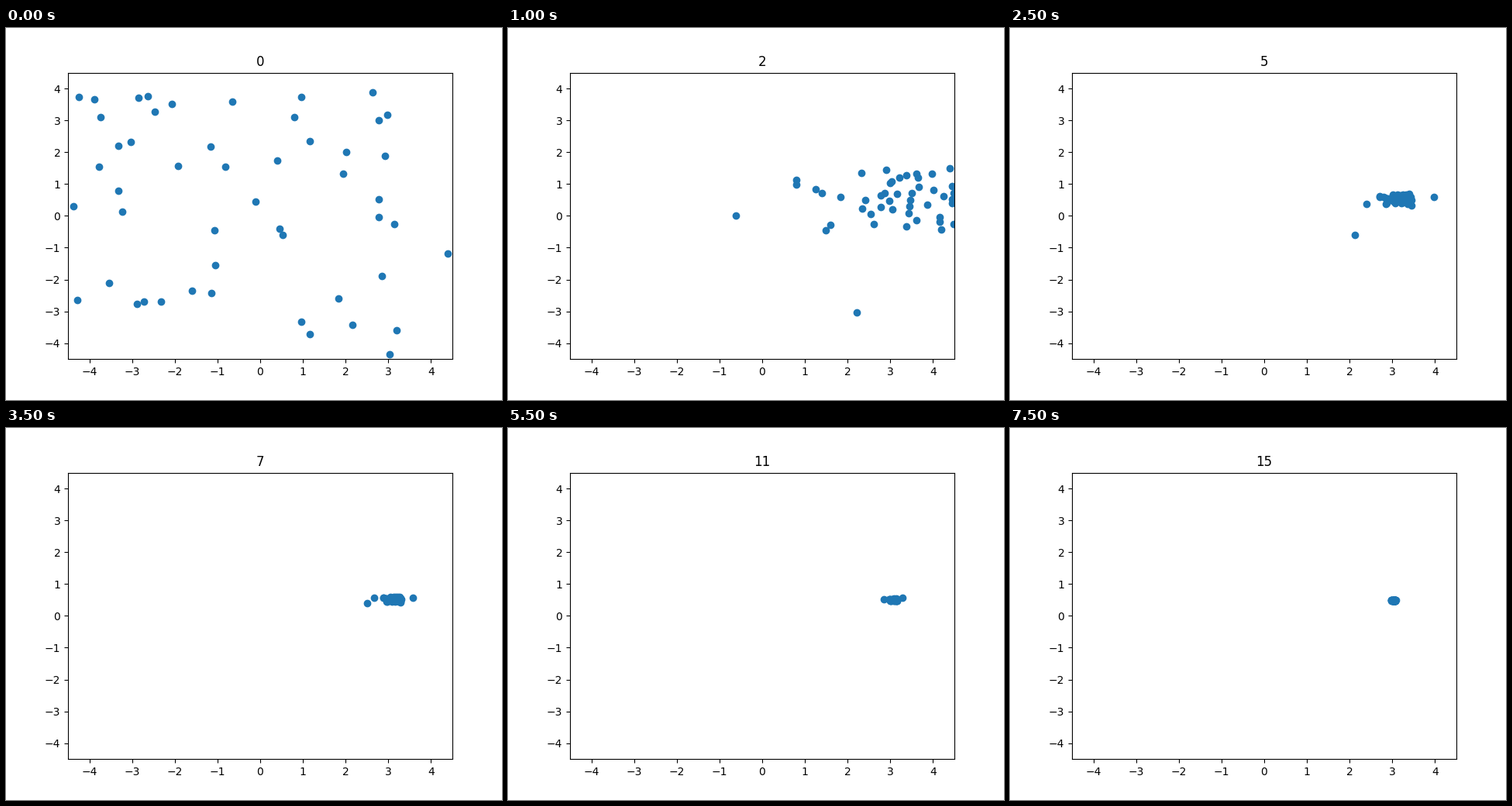
Recreate the animation shown at these times as a matplotlib script. Size 640x480 px, loop 8000 ms.

```python
import numpy as np
import matplotlib.pyplot as plt
from matplotlib.animation import FuncAnimation

STEPS = 16
SWARM = 50
LIMIT = 4.5
BEST = np.array([2.78, 0.52])  # best spot found at the start

# Paths of the slowest particles: left, low and right edge of the swarm.
KEY_STEPS = [0, 1, 3, 5, 7, 11, 15]
STRAGGLERS = np.array([
    [(-4.28, -2.64), (-2.21, -1.84), (-0.09, 0.62), (2.39, 0.37),
     (2.51, 0.39), (2.85, 0.52), (2.98, 0.48)],
    [(3.03, -4.35), (2.89, -3.99), (2.00, -2.72), (2.13, -0.60),
     (2.66, 0.57), (3.00, 0.48), (3.03, 0.48)],
    [(4.40, -1.19), (4.36, -0.77), (4.09, 0.22), (3.98, 0.59),
     (3.58, 0.57), (3.29, 0.57), (3.08, 0.50)],
])

rng = np.random.default_rng(12)
size = (SWARM - len(STRAGGLERS), 2)
start = rng.uniform((-4.4, -4.3), (3.6, 4.2), size)
start[0] = BEST
pulled = BEST + (start - BEST) * rng.uniform(0.25, 0.75, size)
shape = (pulled - pulled.mean(axis=0)) / pulled.std(axis=0)


def core(step):
    """Scatter, one strong pull, then a slow contraction around the optimum."""
    if step == 0:
        return start
    if step == 1:
        return pulled
    center = np.array([3.245 - 0.014 * step, 0.56 - 0.005 * step])
    spread = np.array([0.5, 0.25]) * (3 / step) ** np.array([1.8, 2.0])
    return center + shape * spread


def stragglers(step):
    """Ease out from one key point to the next."""
    i = min(np.searchsorted(KEY_STEPS, step, side="right") - 1, len(KEY_STEPS) - 2)
    a, b = KEY_STEPS[i:i + 2]
    w = 1 - (1 - (step - a) / (b - a)) ** 2
    return (1 - w) * STRAGGLERS[:, i] + w * STRAGGLERS[:, i + 1]


def swarm(step):
    return np.vstack([core(step), stragglers(step)])


fig, ax = plt.subplots(figsize=(6.4, 4.8), dpi=100)
ax.set_xlim(-LIMIT, LIMIT)
ax.set_ylim(-LIMIT, LIMIT)
dots = ax.scatter(*swarm(0).T, color="C0")
title = ax.set_title("0")


def update(step):
    dots.set_offsets(swarm(step))
    title.set_text(str(step))
    return dots, title


anim = FuncAnimation(fig, update, frames=STEPS, interval=500,
                     repeat=True, repeat_delay=0, blit=False)
plt.show()
```
